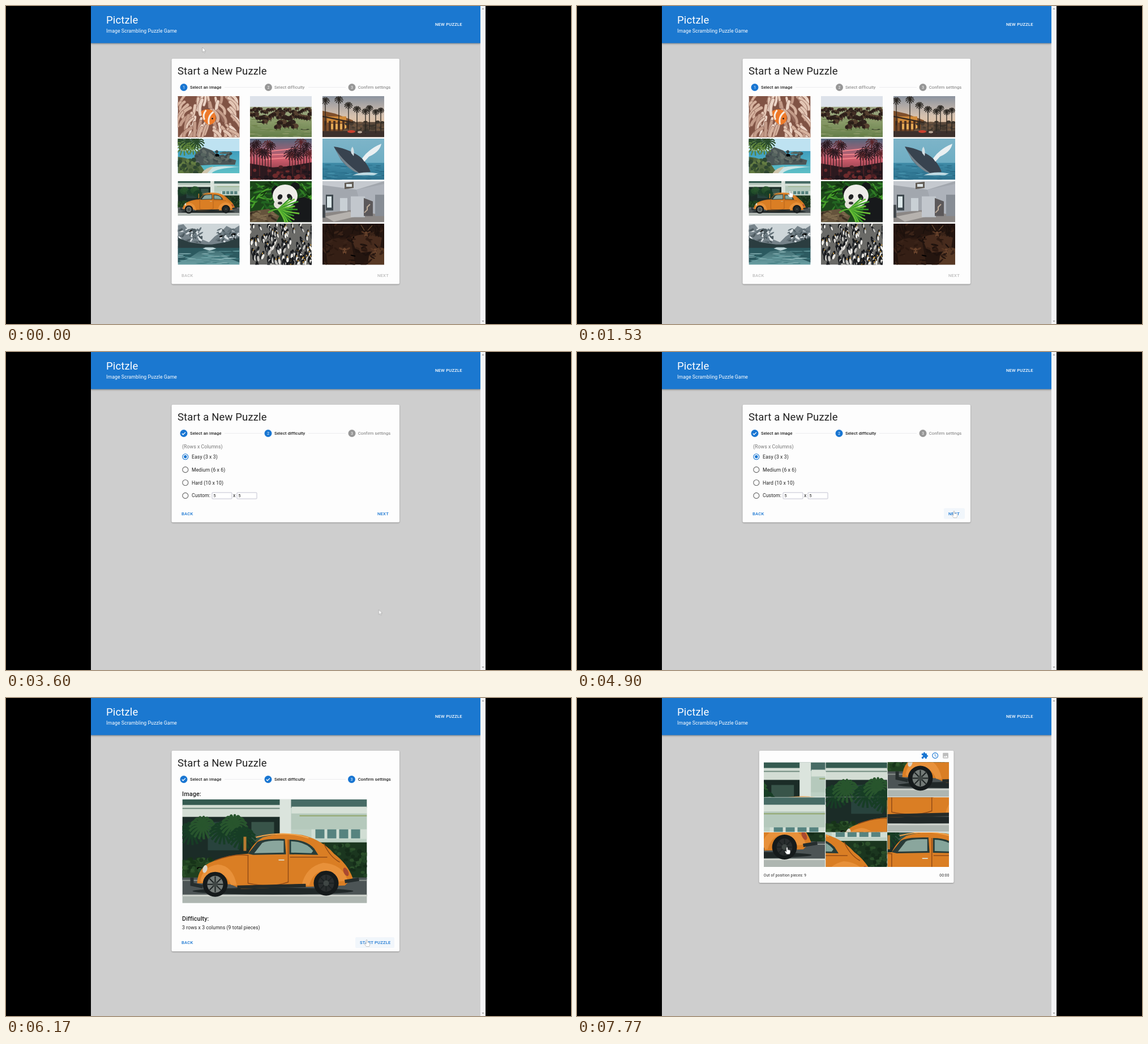
Recreate the animation shown at these times as an HTML page. Size 998 by 561 pixels, loop 8 s.

```html
<!DOCTYPE html>
<html lang="en">
<head>
<meta charset="utf-8">
<title>Image puzzle</title>
<style>
html, body { margin: 0; width: 100%; height: 100%; overflow: hidden; background: #000; }
#stage { display: block; width: 100vw; height: 100vh; font-family: Roboto, Arial, sans-serif; }
text { fill: #222; white-space: pre; }
.h4 { font-size: 18.5px; letter-spacing: .00735em; }
.h6 { font-size: 10.86px; font-weight: 500; letter-spacing: .0075em; }
.body { font-size: 8.7px; letter-spacing: .0094em; }
.label { font-size: 7.6px; letter-spacing: .0107em; }
.btn { font-size: 7.6px; font-weight: 500; letter-spacing: .0286em; fill: #1976d2; }
.small { font-size: 6.5px; letter-spacing: .0333em; }
.num { font-size: 6.5px; text-anchor: middle; fill: #fff; }
.bold { font-weight: 500; }
.mute { fill: #777; }
.off { fill: #bcbcbc; }
.white { fill: #fff; }
.card { fill: #fdfdfd; filter: drop-shadow(0 1px 1px rgba(0,0,0,.32)); }
.bar { fill: #1b78d0; filter: drop-shadow(0 1.5px 1.5px rgba(0,0,0,.4)); }
.hover { fill: #f1f6fb; }

/* Hard switches */
.p1, .p2, .p3, .p4, .on, .idle, .hov1, .hov2, .hov3, .arrow, .hand { animation: 8s step-end infinite; visibility: hidden; }
.p1 { animation-name: p1; } .p2 { animation-name: p2; } .p3 { animation-name: p3; } .p4 { animation-name: p4; }
.on { animation-name: on; } .idle { animation-name: idle; }
.hov1 { animation-name: hov1; } .hov2 { animation-name: hov2; } .hov3 { animation-name: hov3; }
.hand { animation-name: hand; } .arrow { animation-name: arrow; }
@keyframes p1 { 0% { visibility: visible } 41%, 100% { visibility: hidden } }
@keyframes p2 { 0% { visibility: hidden } 41% { visibility: visible } 64%, 100% { visibility: hidden } }
@keyframes p3 { 0% { visibility: hidden } 64% { visibility: visible } 86%, 100% { visibility: hidden } }
@keyframes p4 { 0% { visibility: hidden } 86%, 100% { visibility: visible } }
@keyframes idle { 0% { visibility: visible } 23%, 100% { visibility: hidden } }
@keyframes on { 0% { visibility: hidden } 23% { visibility: visible } 41%, 100% { visibility: hidden } }
@keyframes hov1 { 0% { visibility: hidden } 36.5% { visibility: visible } 41%, 100% { visibility: hidden } }
@keyframes hov2 { 0% { visibility: hidden } 55% { visibility: visible } 64%, 100% { visibility: hidden } }
@keyframes hov3 { 0% { visibility: hidden } 75.5% { visibility: visible } 86%, 100% { visibility: hidden } }
@keyframes hand {
  0%, 41%, 64%, 86% { visibility: hidden }
  6.2%, 36.5%, 55%, 75.5%, 93.2%, 100% { visibility: visible }
  33% { visibility: hidden }
}
@keyframes arrow {
  0%, 41%, 64%, 86% { visibility: visible }
  6.2%, 36.5%, 55%, 75.5%, 93.2%, 100% { visibility: hidden }
  33% { visibility: visible }
}

#cursor { animation: move 8s ease-in-out infinite; }
@keyframes move {
  0%, .4% { transform: translate(347px, 73px) }
  10.4% { transform: translate(470px, 216px) }
  19.1%, 26% { transform: translate(376px, 326px) }
  35.4% { transform: translate(659px, 465px) }
  37.5%, 43% { transform: translate(666px, 474px) }
  52% { transform: translate(593px, 285px) }
  57.5%, 67% { transform: translate(666px, 281px) }
  77.1%, 87.5% { transform: translate(637px, 427px) }
  92% { transform: translate(585px, 145px) }
  94.7%, 100% { transform: translate(371px, 264px) }
}
</style>
</head>
<body>
<svg id="stage" viewBox="0 0 998 561" preserveAspectRatio="none"></svg>
<script>
let seed = 7;
const rnd = (a, b) => {
  seed = (seed * 16807) % 2147483647;
  return +(a + (b - a) * seed / 2147483647).toFixed(1);
};
const pick = list => list[Math.floor(rnd(0, list.length - .01))];
const many = (n, draw) => Array.from({ length: n }, (_, i) => draw(i)).join('');

const rect = (x, y, w, h, fill, more = '') =>
  `<rect x="${x}" y="${y}" width="${w}" height="${h}" fill="${fill}" ${more}/>`;
const oval = (x, y, rx, ry, fill, turn = 0) =>
  `<ellipse cx="${x}" cy="${y}" rx="${rx}" ry="${ry}" fill="${fill}" transform="rotate(${turn} ${x} ${y})"/>`;
const path = (d, fill) => `<path d="${d}" fill="${fill}"/>`;
const line = (d, stroke, w, cap = 'butt') =>
  `<path d="${d}" fill="none" stroke="${stroke}" stroke-width="${w}" stroke-linecap="${cap}"/>`;
const text = (x, y, cls, s) => `<text x="${x}" y="${y}" class="${cls}">${s}</text>`;
const group = (cls, s) => `<g class="${cls}">${s}</g>`;

const fade = (id, ...colors) => `<linearGradient id="${id}" x2="0" y2="1">` +
  colors.map((c, i) => `<stop offset="${i / (colors.length - 1)}" stop-color="${c}"/>`).join('') +
  '</linearGradient>';
const photo = (id, w, h, art) => `<symbol id="${id}" viewBox="0 0 ${w} ${h}" preserveAspectRatio="none">${art}</symbol>`;

// Random dabs that give a surface its grain
const dabs = (n, x, y, w, h, rx, ry, colors, lean = 0) => many(n, () =>
  oval(rnd(x, x + w), rnd(y, y + h), rnd(rx * .5, rx), rnd(ry * .5, ry), pick(colors), rnd(-lean, lean)));
const fronds = (x, y, r, color, w = 1.4, n = 11) => many(n, i => {
  const a = i / n * Math.PI * 2, dx = Math.cos(a) * r, dy = Math.sin(a) * r * .75;
  return line(`M${x} ${y}q${(dx * .6).toFixed(1)} ${(dy - r * .3).toFixed(1)} ${dx.toFixed(1)} ${(dy + r * .2).toFixed(1)}`, color, w);
});
const palm = (x, y, h, r, color) => line(`M${x} ${y}v${h}`, color, 1.3) + fronds(x, y, r, color);

const tentacle = (x, y, w) => {
  const d = `M${x} ${y}q${rnd(-5, 5)} -10 ${((52 - x) * .25 + rnd(-6, 6)).toFixed(1)} ${rnd(-26, -16)}`;
  return line(d, '#94685a', w + 1.4, 'round') + line(d, pick(['#d6b29e', '#e3c6b4', '#c39b88', '#ecd5c6']), w, 'round');
};
const anemone = () => rect(0, 0, 109, 73, '#805344') +
  many(55, i => tentacle(rnd(-4, 113), 8 + i * 1.3, rnd(3.5, 5.5))) +
  path('M41 27Q49 21 60 25Q68 30 67 42Q63 51 54 51Q46 46 43 38Z', '#ee7a2a') +
  line('M50 25Q43 33 47 42', '#f6ece2', 3) + line('M63 28Q52 36 55 50', '#f6ece2', 3) +
  oval(61, 40, 1.4, 1.4, '#211a18') +
  many(11, i => tentacle(i < 5 ? 2 + i * 9 : 66 + (i - 5) * 9, 80 - i % 2 * 7, 5));

const beast = (x, y, s) => oval(x, y, 4.5 * s, 3.4 * s, pick(['#432f25', '#55402f', '#31241e'])) +
  oval(x - 3.6 * s, y + s, 2.2 * s, 2.5 * s, '#2b1e19') +
  line(`M${x - 2.5 * s} ${y + 2 * s}v${3 * s}m${5 * s} ${-3 * s}v${3 * s}`, '#2a1d19', 1);
const bison = () => rect(0, 0, 109, 73, '#dde2ea') + rect(0, 19, 109, 54, 'url(#field)') +
  dabs(70, 0, 40, 109, 33, 8, 1, ['#7f9160', '#6c8149', '#8c9868']) +
  many(32, i => beast(2 + i * 3.4, rnd(22, 29), .75)) +
  many(24, i => beast(2 + i * 4.6, rnd(31, 40), 1.1)) +
  many(7, i => beast(50 + i * 5, rnd(46, 54), 1.3)) + beast(27, 45, 1.1);

const street = () => rect(0, 0, 109, 73, 'url(#dusk)') +
  path('M0 26L22 31 54 43V66H0z', '#80502b') + rect(8, 36, 34, 11, '#cf8a3a') + rect(14, 49, 28, 10, '#e4aa56') +
  many(6, i => rect(3 + i * 8, 44, 4, 18, '#4d3220')) + rect(48, 46, 61, 19, '#5a493b') +
  dabs(35, 40, 45, 69, 17, 5, 3, ['#3b342b', '#6c543f', '#463b30']) +
  rect(0, 62, 109, 11, '#3c302c') + line('M0 36L54 47', '#3a2b21', 2.5) +
  many(8, i => palm([5, 29, 46, 61, 76, 83, 94, 103][i], [8, 6, 16, 23, 27, 21, 28, 25][i], 44 - i, 8 - i * .3, '#292520')) +
  oval(51, 63, 7, 2.5, '#c9412f') + oval(66, 64, 4, 2, '#b9a797') + oval(79, 64, 5, 2, '#3a3230');

const coast = () => rect(0, 0, 109, 61, '#bee2f1') + rect(0, 22, 109, 39, 'url(#sea)') +
  path('M25 48L32 24 45 15 61 21 70 30 80 28 92 35 103 38 101 46 60 46z', '#4b5656') +
  dabs(45, 33, 23, 60, 20, 5, 3, ['#56645f', '#3d494b', '#66706a'], 50) +
  path('M42 61Q54 44 109 50Q67 52 60 61z', '#c9e4e4') + path('M0 32Q24 34 41 48L50 61H0z', '#52673d') +
  path('M42 61Q49 51 63 49L52 61z', '#cfc5ac') +
  dabs(35, 0, 36, 36, 25, 5, 4, ['#3c5530', '#647d42', '#2e4530'], 60) +
  many(5, i => fronds(2 + i * 8, 6 + i % 2 * 9, 17 - i, i % 2 ? '#5d8339' : '#294a2b', 2.2, 13));

const sunset = () => rect(0, 0, 109, 73, 'url(#pink)') +
  line('M20 24L86 17M24 37L84 33M32 29L80 27', '#ef848a', 2) +
  path('M0 44L40 51 68 49 109 42V73H0z', '#2c1a1f') +
  many(16, i => palm(i < 8 ? 2 + i * 5 : 70 + (i - 8) * 5, rnd(4, 32), 55, rnd(8, 12), i % 3 ? '#2c1a20' : '#5a2428')) +
  dabs(35, 0, 48, 109, 25, 5, 4, ['#4c2024', '#1f151b', '#6d2a2c']);

const whale = () => rect(0, 0, 109, 73, 'url(#haze)') + rect(0, 43, 109, 30, 'url(#ocean)') +
  dabs(60, 0, 44, 109, 29, 8, .8, ['#2d738f', '#4994ae', '#266581']) +
  path('M20 14Q41 17 58 27Q76 36 85 59L67 63Q45 54 33 38Z', '#38434f') +
  path('M23 18Q34 38 66 62L57 59Q39 48 30 33Z', '#77858e') +
  path('M70 35Q82 18 104 9Q101 24 82 32L74 41z', '#eaf0f2') + path('M51 26Q49 19 53 14Q57 21 55 31z', '#d3dfe4') +
  path('M56 64Q73 57 98 62L91 65H53z', '#c0dbe3');

const wheel = (x, y, hub) => oval(x, y, 22, 22, '#151a1b') + oval(x, y, 14, 15, hub) +
  many(8, k => line(`M${x} ${y}l${(14 * Math.cos(k * .785)).toFixed(1)} ${(14 * Math.sin(k * .785)).toFixed(1)}`, '#1c2222', 2)) +
  oval(x, y, 5, 5, '#3f4644');
const car = () => rect(0, 0, 326, 183, '#bdd0c4') +
  rect(0, 0, 190, 12, '#345a50') + rect(0, 10, 191, 22, '#d3ddd4') + line('M0 16H190', '#728c80', 2) +
  rect(0, 31, 190, 112, '#1b2c27') + rect(45, 40, 55, 50, '#28433d') + rect(122, 40, 40, 35, '#385449') +
  rect(190, 0, 136, 15, '#476b65') + rect(193, 13, 133, 13, '#d7e1d8') + rect(190, 25, 136, 28, '#b5c9bc') +
  rect(172, 0, 20, 66, '#dbe4dd') + line('M207 29H326', '#92a76e', 2) +
  rect(228, 53, 98, 17, '#d1ded4') + many(4, i => rect(235 + i * 21, 53, 16, 16, '#56837f')) +
  rect(0, 107, 90, 35, '#20401f') + rect(236, 76, 90, 65, '#1b361f') +
  many(5, i => fronds([16, 36, 72, 91, 106][i], [58, 48, 57, 45, 66][i], 24, i % 2 ? '#28552d' : '#173d25', 4, 17)) +
  dabs(80, 0, 104, 100, 34, 5, 4, ['#284d27', '#173319', '#31572c']) +
  dabs(80, 240, 80, 86, 58, 5, 4, ['#234526', '#152c19', '#2b4f2a']) +
  rect(0, 138, 326, 33, '#4c5455') + line('M0 143H326', '#89908c', 2) +
  rect(0, 168, 326, 15, '#aeb6b1') + line('M0 170H326', '#d5d8d2', 2) +
  oval(160, 162, 142, 6, '#202828') +
  path('M26 148Q27 119 55 109Q82 97 116 96Q125 77 142 67Q170 58 212 63Q246 71 268 96Q292 114 301 139L287 152 104 158 85 150z', '#da7e24') +
  path('M116 96L132 76Q141 69 181 70L183 97L125 98z', '#293b38') + path('M127 95L141 77Q151 72 179 73V94z', '#8aa69d') +
  path('M189 71Q219 71 233 87L240 98 189 97z', '#263c39') + path('M192 74Q219 75 231 91L228 95 192 94z', '#84a59b') +
  path('M32 144Q35 119 63 115Q89 117 96 151L86 151Q76 128 55 132Q43 137 37 148z', '#e8913a') +
  path('M211 151Q218 119 249 112Q282 114 292 143L277 145Q263 123 244 127Q229 133 224 152z', '#e8913a') +
  line('M57 108Q92 95 117 99M187 71V146Q157 157 116 148V98M190 102H256M250 78Q260 101 278 111', '#914b17', 1.5) +
  line('M130 67Q180 54 223 68', '#f3a44d', 2) + line('M97 155L218 152', '#252b29', 6) +
  wheel(58, 150, '#737a77') + wheel(254, 148, '#292d2e') +
  line('M17 138V150L36 154M287 145L312 141', '#252d2d', 6) + oval(40, 123, 4, 7, '#dad5c8', 15) +
  oval(289, 128, 4, 8, '#aa4930', -25) + rect(108, 66, 5, 25, '#b87a31') + line('M170 107h10', '#ded4bc', 2);

const panda = () => rect(0, 0, 109, 73, '#1c471a') +
  dabs(90, 0, 0, 109, 50, 9, 2, ['#307c25', '#46a02a', '#12330f', '#226421'], 60) +
  path('M78 36Q92 22 109 34V73H70z', '#17191b') + oval(44, 17, 6, 9, '#151719', 20) + oval(80, 9, 8, 7, '#151719') +
  oval(62, 26, 22, 20, '#efede9') + oval(54, 41, 12, 9, '#e4e0d9') + oval(53, 28, 4, 5, '#202123', 35) +
  oval(70, 28, 4, 6, '#202123', -35) + oval(53, 39, 4, 2.5, '#303133') +
  path('M0 54L33 49 52 62 46 73H0z', '#65533c') +
  dabs(30, 0, 54, 46, 18, 6, 2, ['#4b3c2a', '#7d6a4d', '#392d22'], 30) +
  many(12, i => {
    const a = -.75 + i * .19, r = 30 + i % 3 * 4;
    return line(`M50 50q${(r * .5).toFixed(1)} ${(r * Math.sin(a) * .7).toFixed(1)} ${(r * Math.cos(a)).toFixed(1)} ${(r * Math.sin(a)).toFixed(1)}`,
      i % 2 ? '#6ac036' : '#38962a', 2.6);
  }) + line('M32 56Q45 46 62 52', '#57ad32', 2.5);

const room = () => rect(0, 0, 109, 73, '#a2a7ae') + path('M0 0H109L60 15 0 7z', '#c5c9cf') +
  path('M60 15L109 5V63L72 58z', '#adb2ba') + path('M0 57L52 51 109 61V73H0z', '#8b8785') +
  path('M5 63L48 54 63 62 20 72z', '#b6b2ae') +
  rect(6, 24, 13, 28, '#3d474d') + rect(8, 27, 8, 20, '#dce7e9') + rect(31, 30, 13, 23, '#c9d0d5') +
  rect(50, 27, 25, 37, '#c2c7cd') + path('M73 30L89 36V62H73z', '#5b585a') + line('M74 56l5-5v-5l5-5', '#bcaa98', 2) +
  rect(93, 24, 16, 38, '#878d95') + path('M39 3L55 1V12L39 14z', '#635d56') + rect(42, 5, 10, 5, '#dce4e7') + rect(0, 42, 5, 23, '#44494e');

const lake = () => rect(0, 0, 109, 73, '#ced6d9') + rect(0, 40, 109, 33, 'url(#water)') +
  path('M0 3L10 1 22 15 34 20 43 28 55 33 65 23 76 15 86 4 98 10 109 3V42H0z', '#76838a') +
  dabs(55, 0, 10, 42, 24, 5, 2, ['#dce3e6', '#4c595f', '#65737a'], 60) +
  dabs(55, 70, 10, 39, 24, 5, 2, ['#dce3e6', '#4c595f', '#65737a'], 60) +
  path('M0 25L20 33 48 37 60 37 84 33 109 25V44H0z', '#2b3d40') +
  path('M0 43H109V69L92 62 74 49 56 46 38 49 19 62 0 69z', '#2c5a60') +
  path('M44 44L56 48 68 44 62 42H49z', '#b8d2d5') + dabs(35, 0, 48, 109, 23, 12, 1, ['#6ea4a8', '#3d767b', '#8ab4b7']);

const penguin = (x, y, s, lean) => oval(x, y, 3.2 * s, 7 * s, pick(['#26282b', '#3a3d40', '#1b1d20']), lean) +
  oval(x + 1.6 * s, y + 2 * s, 2.1 * s, 5 * s, pick(['#dcdad4', '#c3c2be', '#eceae5']), lean) +
  oval(x + lean * .1, y - 6 * s, 1.9 * s, 2.4 * s, '#17191c') +
  (rnd(0, 1) > .6 ? oval(x + 1.2, y - 4 * s, s, 1.5 * s, '#d7a446') : '');
const penguins = () => rect(0, 0, 109, 73, '#6a6a67') +
  many(120, i => penguin(rnd(-2, 111), i * .66, .65 + i / 250, rnd(-28, 28)));

const deerHead = (x, y, s) => oval(x, y, 4 * s, 7 * s, '#68422b') + oval(x - 7 * s, y - 5 * s, 4.5 * s, 1.8 * s, '#573623', 25) +
  oval(x + 7 * s, y - 5 * s, 4.5 * s, 1.8 * s, '#573623', -25) + oval(x, y + 5 * s, 1.7 * s, 1.7 * s, '#23150f') +
  oval(x - 2.5 * s, y - s, s, s, '#1b100c') + oval(x + 2.5 * s, y - s, s, s, '#1b100c');
const deer = () => rect(0, 0, 109, 73, '#24150f') +
  path('M5 34Q25 20 50 28L58 73H9z', '#351f15') + path('M50 24Q78 14 105 25L101 48 61 52z', '#472b1d') +
  path('M82 58Q94 37 109 44V73H80z', '#583925') +
  dabs(90, 0, 0, 109, 73, 7, 2, ['#2b1810', '#3a2318', '#1d110d'], 70) +
  many(16, () => line(`M${rnd(0, 109)} 0l${rnd(-12, 12)} ${rnd(8, 25)}`, '#1b100c', 1.3)) +
  deerHead(39, 49, .9) + deerHead(77, 19, .75) + deerHead(93, 49, .75) +
  line('M74 12l-6-10M80 12l8-9', '#674930', 1.3);

const cols = [303.5, 431, 559], rows = [159, 234, 309, 384];
const photos = { anemone, bison, street, coast, sunset, whale, car, panda, room, lake, penguins, deer };
const wide = { coast: 61, car: 61 };
const use = (id, x, y, w, h) => `<use href="#${id}" x="${x}" y="${y}" width="${w}" height="${h}"/>`;

const defs = '<defs>' + fade('field', '#a0a886', '#889a68', '#647d48') + fade('dusk', '#8b939f', '#d8c2ae', '#eebd88') +
  fade('sea', '#3f9dbd', '#5dbfc6') + fade('pink', '#56687f', '#cf5c6c', '#5e2b34') + fade('haze', '#7db4c8', '#65a9c0') +
  fade('ocean', '#3f8ba7', '#2c718d') + fade('water', '#345f64', '#6ba0a4') +
  Object.entries(photos).map(([id, art]) => id === 'car' ? photo(id, 326, 183, art()) : photo(id, 109, wide[id] || 73, art())).join('') +
  '</defs>';

const tick = 'l2 2 4.2-4.2';
function head(step, height) {
  const xs = [314, step < 2 ? 463.5 : 463, step < 3 ? 611 : 610.5];
  const names = ['Select an image', 'Select difficulty', 'Confirm settings'];
  return `<rect class="card" x="292.5" y="93" width="402.5" height="${height}" rx="2"/>` +
    text(303, 121, 'h4', 'Start a New Puzzle') + line('M386 143.5H452M534 143.5H600', '#e6e6ea', .7) +
    names.map((name, i) => oval(xs[i], 143.5, 6.5, 6.5, i < step ? '#1976d2' : '#979797') +
      (i < step - 1 ? line(`M${xs[i] - 3.2} 143.8${tick}`, '#fff', 1.3) : text(xs[i], 145.9, 'num', i + 1)) +
      text([325, 474, 621.8][i], 146.2, 'label ' + (i < step ? 'bold' : 'mute'), name)).join('');
}
const hover = (cls, x, y, w) => `<rect class="hover ${cls}" x="${x}" y="${y}" width="${w}" height="19" rx="2"/>`;

const chooser = head(1, 397.5) +
  Object.keys(photos).map((id, i) => use(id, cols[i % 3], rows[i / 3 | 0], 109, wide[id] || 72.5)).join('') +
  group('on', use('car', 304.5, 310, 109.5, 62) + rect(304.2, 309.7, 110.3, 62.8, 'none', 'stroke="#f5a623" stroke-width="1.5"')) +
  hover('hov1', 648, 466, 37) + text(310, 478, 'btn off', 'BACK') +
  group('idle', text(656, 478, 'btn off', 'NEXT')) + group('on', text(656, 478, 'btn', 'NEXT'));

const levels = ['Easy (3 x 3)', 'Medium (6 x 6)', 'Hard (10 x 10)', 'Custom:'];
const field = x => rect(x, 248, 35, 11, '#fff', 'stroke="#aaaabd" stroke-width=".7" rx="1"') + text(x + 2.3, 256.3, 'label', '5');
const difficulty = head(2, 207.5) + text(311, 170, 'body mute', '(Rows x Columns)') +
  levels.map((s, i) => {
    const y = 184.8 + i * 22.85, color = i ? '#666' : '#1976d2';
    return `<circle cx="316.8" cy="${y}" r="5" fill="none" stroke="${color}" stroke-width="1.1"/>` +
      (i ? '' : oval(316.8, y, 2.7, 2.7, color)) + text(328, y + 3, 'body', s);
  }).join('') + field(364) + text(401, 256.3, 'body', 'x') + field(408) +
  hover('hov2', 648, 275.5, 37) + text(310, 287.8, 'btn', 'BACK') + text(656, 287.8, 'btn', 'NEXT');

const confirm = head(3, 354) + text(311, 173.2, 'h6', 'Image:') + use('car', 311.5, 178.7, 326, 183) +
  text(311, 392.8, 'h6', 'Difficulty:') + text(311, 407.6, 'body', '3 rows x 3 columns (9 total pieces)') +
  hover('hov3', 617, 422, 69) + text(310, 434.3, 'btn', 'BACK') + text(625, 434.3, 'btn', 'START PUZZLE');

// Source cell (column + 3 * row) shown in each slot
const order = [1, 0, 6, 2, 3, 7, 8, 5, 4];
const pieces = order.map((cell, i) =>
  `<svg x="${330 + i % 3 * 109.3}" y="${113.5 + (i / 3 | 0) * 61.8}" width="108.4" height="60.9" preserveAspectRatio="none"
    viewBox="${cell % 3 * 108.67} ${(cell / 3 | 0) * 61} 108.67 61">${use('car', 0, 0, 326, 183)}</svg>`).join('');
const icon = (x, fill, d) => `<path transform="translate(${x} 95) scale(.543)" d="${d}" fill="${fill}"/>`;
const board = '<rect class="card" x="321.7" y="93" width="343.8" height="233" rx="2"/>' +
  icon(607.7, '#1976d2', 'M20.5 11H19V7c0-1.1-.9-2-2-2h-4V3.5a2.5 2.5 0 0 0-5 0V5H4c-1.1 0-2 .9-2 2v3.8h1.5a2.7 2.7 0 0 1 0 5.4H2V20c0 1.1.9 2 2 2h3.8v-1.5a2.7 2.7 0 0 1 5.4 0V22H17c1.1 0 2-.9 2-2v-4h1.5a2.5 2.5 0 0 0 0-5z') +
  '<circle cx="632.7" cy="101.5" r="4.9" fill="none" stroke="#1976d2" stroke-width="1.1"/>' + line('M632.4 98.5v3.3l2.5 1.5', '#1976d2', .9) +
  icon(644.5, '#bdbdbd', 'M21 19V5c0-1.1-.9-2-2-2H5c-1.1 0-2 .9-2 2v14c0 1.1.9 2 2 2h14c1.1 0 2-.9 2-2zM8.5 13.5l2.5 3 3.5-4.5 4.5 6H5z') +
  pieces + text(329.8, 314.5, 'small', 'Out of position pieces: 9') + text(640.3, 314.5, 'small', '00:00');

const shell = rect(0, 0, 998, 561, '#000') + rect(150, 0, 688, 561, '#cecece') +
  '<rect class="bar" x="150" y="0" width="688" height="65.5"/>' + rect(838, 0, 9, 561, '#f4f4f6') +
  path('M840.5 6l2-2.5 2 2.5zM840.5 555l2 2.5 2-2.5z', '#999') +
  text(177, 31.3, 'h4 white', 'Pictzle') + text(177, 46.8, 'body white', 'Image Scrambling Puzzle Game') +
  text(758, 35.2, 'btn white', 'NEW PUZZLE') + rect(0, 0, 150, 80, '#000') + rect(847, 0, 151, 80, '#000');

const cursor = '<g id="cursor" fill="#fff" stroke="#8a8a8a" stroke-width=".5" stroke-linejoin="round">' +
  '<path class="arrow" d="M0 0V8.5L2 6.7 3.4 9.8 4.7 9.2 3.4 6.2H6z"/>' +
  '<path class="hand" d="M-1 0Q0-1 1 0V4Q2 3 2.7 4.2Q3.7 3.4 4.3 4.6Q5.6 4.1 5.7 5.6V8Q5.4 10 4.5 11.4H-.5L-3.6 7.4Q-3.8 5.8-2.4 6.2L-1 7.5z"/></g>';

document.getElementById('stage').innerHTML = defs + shell +
  [chooser, difficulty, confirm, board].map((page, i) => group('p' + (i + 1), page)).join('') + cursor;
</script>
</body>
</html>
```
